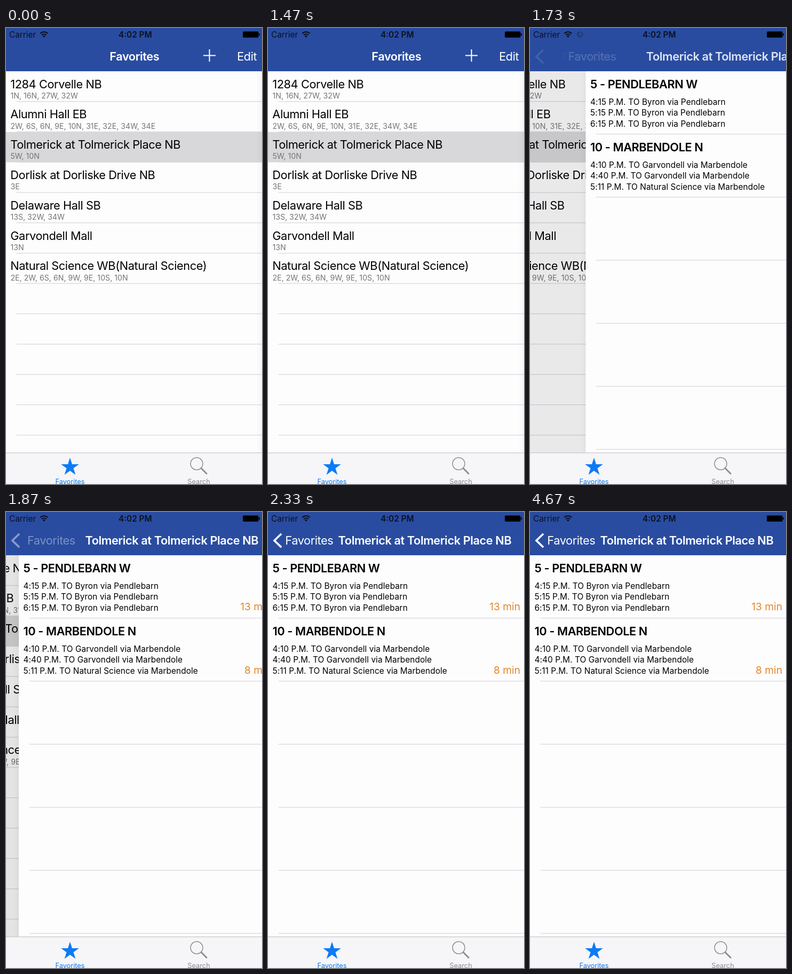
Animation of 480 by 854 pixels, one loop 4.74 s. Source, as an HTML page:

```html
<!DOCTYPE html>
<html lang="en">
<head>
<meta charset="utf-8">
<title>Bus favorites</title>
<style>
  :root { --t: 0; --push: cubic-bezier(.32, .72, 0, 1); }
  html, body { margin: 0; width: 100%; height: 100%; overflow: hidden; background: #fefdfe; }
  svg { display: block; width: 100%; height: 100%; font-family: Inter, "Liberation Sans", sans-serif; }

  .row, .nav { font-size: 21.76px; letter-spacing: -.42px; }
  .bold { font-weight: 600; }
  .sub { font-size: 14.08px; letter-spacing: .05px; fill: #747476; }
  .line { font-size: 15.36px; }
  .time { letter-spacing: .08px; }
  .min { font-size: 19.2px; fill: #e0862a; text-anchor: end; }
  .nav { fill: #fff; }
  .mid { text-anchor: middle; }
  .tab { font-size: 12.8px; text-anchor: middle; }
  .sep { fill: #d9d8dd; }

  /* Every animation is paused; the stepped clock --t moves it through its delay. */
  .anim { animation: var(--move) calc((1588 - var(--t)) * 1ms) both paused; }
  #list { --move: list 577ms var(--push); }
  #dim { --move: show 577ms var(--push); }
  #detail { --move: detail 577ms var(--push); }
  #oldTitle { --move: oldTitle 500ms var(--push); }
  #newTitle { --move: newTitle 500ms var(--push); }
  #back { --move: back 500ms var(--push); }
  .out { --move: hide 150ms linear; }
  .in { --move: show 170ms linear; }
  .inSlow { --move: show 720ms linear; }
  #chevron { animation: show 400ms linear calc((1689 - var(--t)) * 1ms) both paused; }
  #busy { opacity: 0; animation: busy 270ms linear calc((1590 - var(--t)) * 1ms) paused; }

  @keyframes list { to { transform: translateX(-144px); } }
  @keyframes detail { from { transform: translateX(480px); } to { transform: none; } }
  @keyframes oldTitle { to { transform: translateX(-160px); } }
  @keyframes newTitle { from { transform: translateX(528px); } to { transform: none; } }
  @keyframes back { from { transform: translateX(240px); } to { transform: none; } }
  @keyframes show { from { opacity: 0; } to { opacity: 1; } }
  @keyframes hide { from { opacity: 1; } to { opacity: 0; } }
  @keyframes busy { from, to { opacity: 1; } }
</style>
</head>
<body>
<svg viewBox="0 0 480 854" xmlns="http://www.w3.org/2000/svg">
  <defs>
    <linearGradient id="shade">
      <stop offset="0" stop-opacity="0"/>
      <stop offset="1" stop-opacity=".03"/>
    </linearGradient>
  </defs>

  <g id="list" class="anim">
    <rect y="81" width="480" height="715" fill="#fefdfe"/>
    <g id="rows"></g>
    <rect id="dim" class="anim" y="81" width="480" height="715" fill="rgba(0,0,0,.1)"/>
  </g>

  <g id="detail" class="anim">
    <rect x="-11" y="81" width="11" height="715" fill="url(#shade)"/>
    <rect y="81" width="480" height="715" fill="#fefdfe"/>
    <g id="routes"></g>
  </g>

  <rect width="480" height="81" fill="#294ca0"/>
  <g id="status">
    <text class="line" x="6" y="17.5" fill="#0b1020">Carrier</text>
    <g fill="none" stroke="#0b1020" stroke-width="2">
      <path d="M64.3 10.2a10 10 0 0 1 14 0M67 13.2a6.2 6.2 0 0 1 8.6 0"/>
    </g>
    <path d="M71.3 18l-2.6-2.9a3.8 3.8 0 0 1 5.2 0z" fill="#0b1020"/>
    <g id="busy" stroke="#0b1020" stroke-width="1.3" stroke-linecap="round"></g>
    <text class="line bold mid" x="242.3" y="17.5" fill="#0b1020">4:02 PM</text>
    <rect x="444" y="6.5" width="29.5" height="11.5" rx="2"/>
    <rect x="474.3" y="10" width="1.7" height="4.5" rx=".8"/>
  </g>

  <g class="nav">
    <g id="oldTitle" class="anim"><text class="bold mid anim out" x="240.8" y="60.8">Favorites</text></g>
    <g class="anim out">
      <path d="M370 51.5h23M381.5 40v23" stroke="#fff" stroke-width="2"/>
      <text x="433.2" y="60.8">Edit</text>
    </g>
    <path id="chevron" d="M25 40.7L11.9 53.4L25 66.1" fill="none" stroke="#fff" stroke-width="3.6"/>
    <g id="back" class="anim"><text class="anim inSlow" x="32.3" y="60.8">Favorites</text></g>
    <g id="newTitle" class="anim"><text class="bold mid anim in" x="294" y="60.8">Tolmerick at Tolmerick Place NB</text></g>
  </g>

  <g id="tabs">
    <rect y="795" width="480" height="59" fill="#f6f5f7"/>
    <rect y="795" width="480" height="1.2" fill="#c6c6c9"/>
    <path d="M120 804.8L130.4 836.8L103.2 817.1H136.8L109.6 836.8Z" fill="#0b7bf6"/>
    <text class="tab" x="120" y="854.3" fill="#0b7bf6">Favorites</text>
    <g fill="none" stroke="#8d8d92">
      <circle cx="357.5" cy="816" r="11.5" stroke-width="1.5"/>
      <path d="M366 824.5L376 834.5" stroke-width="3" stroke-linecap="round"/>
    </g>
    <text class="tab" x="361.5" y="854.3" fill="#8d8d92">Search</text>
  </g>
</svg>

<script>
  const LOOP = 4740, STEP = 1000 / 15;
  const stops = [
    ["1284 Corvelle NB", "1N, 16N, 27W, 32W"],
    ["Alumni Hall EB", "2W, 6S, 6N, 9E, 10N, 31E, 32E, 34W, 34E"],
    ["Tolmerick at Tolmerick Place NB", "5W, 10N"],
    ["Dorlisk at Dorliske Drive NB", "3E"],
    ["Delaware Hall SB", "13S, 32W, 34W"],
    ["Garvondell Mall", "13N"],
    ["Natural Science WB(Natural Science)", "2E, 2W, 6S, 6N, 9W, 9E, 10S, 10N"]
  ];
  const routes = [
    ["5 - PENDLEBARN W", "13 min",
      "4:15 P.M. TO Byron via Pendlebarn",
      "5:15 P.M. TO Byron via Pendlebarn",
      "6:15 P.M. TO Byron via Pendlebarn"],
    ["10 - MARBENDOLE N", "8 min",
      "4:10 P.M. TO Garvondell via Marbendole",
      "4:40 P.M. TO Garvondell via Marbendole",
      "5:11 P.M. TO Natural Science via Marbendole"]
  ];
  const byId = id => document.getElementById(id);

  function add(parent, tag, attrs, label = "") {
    const el = document.createElementNS("http://www.w3.org/2000/svg", tag);
    for (const key in attrs) el.setAttribute(key, attrs[key]);
    el.textContent = label;
    parent.append(el);
  }
  const text = (parent, cls, x, y, label) => add(parent, "text", { class: cls, x, y }, label);
  const separator = (parent, y) => add(parent, "rect", { class: "sep", x: 19.5, y, width: 461, height: 1.3 });

  const rowBox = byId("rows");
  for (let i = 0; i < 12; i++) separator(rowBox, 137 + 56.8 * i);
  add(rowBox, "rect", { y: 194.7, width: 480, height: 56.8, fill: "#d8d7d9" });
  stops.forEach(([name, lines], i) => {
    text(rowBox, "row", 8.3, 112.6 + 56.8 * i, name);
    text(rowBox, "sub", 8.4, 131.8 + 56.8 * i, lines);
  });

  const routeBox = byId("routes");
  for (let i = 0; i < 6; i++) separator(routeBox, 198 + 118.1 * i);
  routes.forEach(([name, wait, ...times], i) => {
    const top = 118.1 * i;
    text(routeBox, "row bold", 8.5, 112.6 + top, name);
    times.forEach((label, j) => text(routeBox, "line time", 8.5, 143.5 + 20.7 * j + top, label));
    text(routeBox, "min", 473, 184.4 + top, wait);
  });

  for (let i = 0; i < 8; i++) {
    add(byId("busy"), "path", {
      d: "M94 6.2v2.6", transform: `rotate(${i * 45} 94 12)`, opacity: .3 + i * .07
    });
  }

  const start = performance.now();
  function tick() {
    const t = (performance.now() - start) % LOOP;
    const held = Math.floor((t + 4) / STEP) * STEP;
    document.documentElement.style.setProperty("--t", held.toFixed(1));
    requestAnimationFrame(tick);
  }
  tick();
</script>
</body>
</html>
```
